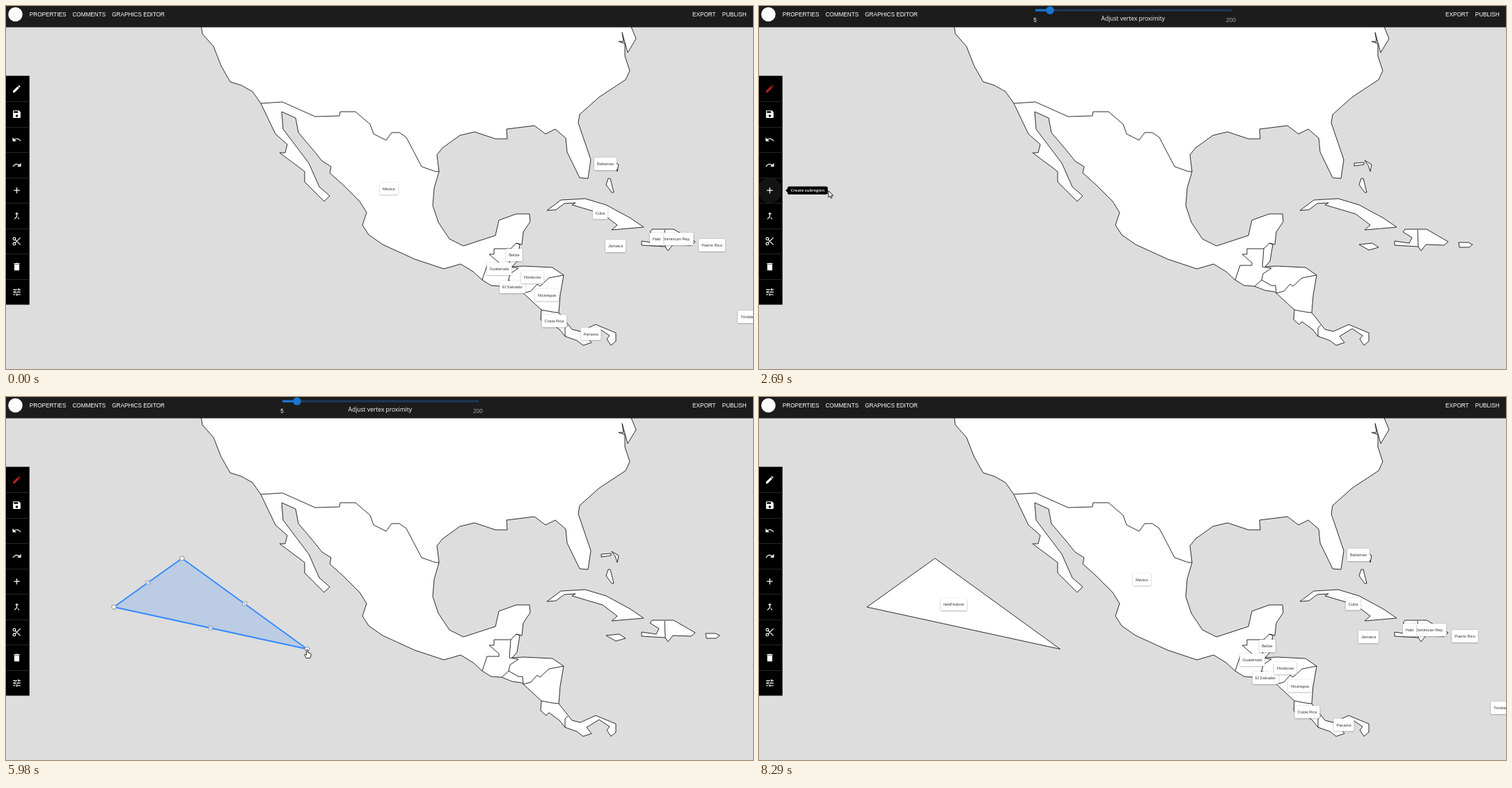
An HTML page with a canvas for the animation above (8.59 s loop, 1073 by 522 pixels).

```html
<!DOCTYPE html>
<html lang="en">
<head>
<meta charset="utf-8">
<title>Map editor</title>
<style>
html, body { margin: 0; width: 100%; height: 100%; overflow: hidden; background: #ddd; }
canvas { display: block; }
</style>
</head>
<body>
<canvas id="stage" width="1073" height="522"></canvas>
<script>
const W = 1073, H = 522, LOOP = 8590;
const ctx = document.getElementById('stage').getContext('2d');
const SANS = '"Liberation Sans", Arial, sans-serif';
const OPEN = '"Open Sans", "Noto Sans", sans-serif';

// The mainland is one coastline, followed from the north-west round to the north-east
const mainland = new Path2D(
  // California, Baja and the Mexican Pacific
  'M280 26L282 40 298 58 309 86 322 109 338 114 354 123 366 140 387 184 404 199 401 211 393 211' +
  ' 429 238 429 253 457 281 465 273 450 260 435 226 398 177 396 152 416 161 420 182 442 208' +
  ' 454 223 467 231 465 240 484 257 508 281 518 297 512 315 521 329 541 343 587 364 629 378' +
  ' 653 371 671 382 684 394' +
  // Central America, down and back
  'L697 402 712 403 727 409 741 411 769 437 768 451 776 458 780 454 795 465 803 475 820 481' +
  ' 829 488 841 484 834 475 852 464 867 474 863 479 869 488 876 482 876 470 847 458 825 468' +
  ' 813 465 794 441 796 416 801 387 785 376 744 374 727 375 734 367 738 343 733 341' +
  // Gulf and Atlantic
  'L741 343 743 325 753 310 752 299 733 299 708 308 703 330 657 345 637 335 621 311 613 287' +
  ' 615 262 622 238 619 214 627 204 652 186 673 181 703 191 720 191 719 177 759 172 775 184' +
  ' 789 177 804 190 806 210 824 247 836 248 840 221 822 168 824 156 852 131 890 106 896 93' +
  ' 889 72 889 54 880 51 887 51 885 38 893 67 905 47 898 30 914 26Z');

const borders = new Path2D(
  'M366 140L397 138 444 159 479 158 480 152 502 152 523 170 528 184 546 193 554 182 565 182' +
  ' 575 189 597 231 617 238 622 238' +
  'M733 341L725 349H701V357H694L708 369V373H691L684 394' +
  'M725 349L723 375 736 377 724 385 722 394 712 403M722 394L736 402H742L743 413' +
  'L754 410 763 400 767 403 780 391 801 387M769 437L785 440 794 441M807 459L803 463 803 475');

const islands = [
  'M777 294L797 279 832 277 862 286 897 305 916 318 870 322 878 315 857 299 813 286 818 283 802 284 790 293Z',
  'M913 338L934 341 938 333 925 325 928 321 959 321 990 339 984 344 958 343 951 352 947 346 913 344ZM946 322L947 346',
  'M1005 340H1019L1025 343 1020 347H1006Z',
  'M862 343L881 341 890 347 876 351Z',
  'M855 226L869 225V228L855 230Z',
  'M870 222L880 228 878 238 875 229Z',
  'M865 248H868L873 268H870L862 257Z'
].map(d => new Path2D(d));

const labels = [
  ['Bahamas', 861, 227], ['Mexico', 550, 262.5], ['Cuba', 853.5, 297.5],
  ['Dominican Rep.', 963, 335], ['Haiti', 934.5, 335], ['Jamaica', 875.5, 345],
  ['Puerto Rico', 1014, 344], ['Belize', 730, 358], ['Guatemala', 708.5, 378],
  ['El Salvador', 727.5, 404], ['Honduras', 756, 390], ['Nicaragua', 777, 415.5],
  ['Costa Rica', 787.5, 453], ['Panama', 840, 471.5], ['Trinidad and Tobago', 1081, 447]
];

// Icons on a 24 unit grid: filled part, stroked part, mirrored
const back = ['M2 7V16H11Z', 'M5.5 12.8Q14 5.5 21.3 15.6'];
const icons = [
  ['M3 17.2V21H6.8L17.8 10 14 6.2ZM20.8 7L17 3.2 15.1 5.1 18.9 8.9Z'],
  ['M4 3H17L21 7V20L20 21H4L3 20V4ZM5 5V9H15V5ZM12 13a3 3 0 1 0 .1 0Z'],
  back,
  [...back, true],
  ['', 'M5 12H19M12 5V19'],
  ['M7.5 8H16.5L12 3.5Z', 'M6.3 19.7L12 14V7M14.3 16.3L17.7 19.7'],
  ['', 'M8 8L20.5 20.5M8 16L20.5 3.5M9 6a3 3 0 1 0-6 0 3 3 0 0 0 6 0M9 18a3 3 0 1 0-6 0 3 3 0 0 0 6 0'],
  ['M6 7H18V20L17 21H7L6 20ZM5 4H8.5L9.5 3H14.5L15.5 4H19V6H5Z'],
  ['', 'M3 6H13M16 3V9M16 6H21M3 12H8M8 9V15M11 12H21M3 18H9M12 15V21M12 18H21']
].map(([fill, line, flip]) => [new Path2D(fill), new Path2D(line || ''), flip ? -1 : 1]);

const arrowShape = new Path2D('M0 0V9.6L2.2 7.6 3.7 11 5.2 10.3 3.8 7.1H6.8Z');
const handShape = new Path2D('M-1 1Q0-.8 1 1V5L4.6 6 5.4 7V9.6L4.2 13H-1.2L-3.8 8.6Q-4-.2-1 8.8Z'.replace('Q-4-.2', 'Q-3.6 6.4'));

const A = [252.8, 232], B = [155, 302], C = [432.6, 362.5];
const PEN = [27, 119.5], PLUS = [16, 267], DISK = [14, 156], EXIT = [1050, 486];
const cell = i => 119 + i * 36.55;

// Times of the user's actions
const EDIT = 970, PICK = 2760, FIRST = 3280, SECOND = 4020, CLOSE = 4710, SAVE = 7250, SAVED = 7280;

const smooth = u => u * u * (3 - 2 * u);
const easeOut = u => 1 - (1 - u) ** 2;
const clamp = u => Math.max(0, Math.min(1, u));

// start, end, from, to, easing, sag of the path
const moves = [
  [30, 870, [1022, 514], PEN, easeOut, 0],
  [EDIT, 1750, PEN, PLUS, smooth, 0],
  [2410, 3110, PLUS, A, smooth, 12],
  [FIRST, 3803, A, B, smooth, 0],
  [SECOND, 4510, B, C, smooth, 0],
  [5980, 6690, C, DISK, smooth, 0],
  [7290, 8090, DISK, EXIT, smooth, 0],
  [8090, 8290, EXIT, [1058, 524], u => u * u, 0]
];

function pointer(t) {
  const [t0, t1, a, b, ease, sag] = moves.filter(m => t >= m[0]).pop() || moves[0];
  const p = ease(clamp((t - t0) / (t1 - t0)));
  return [a[0] + (b[0] - a[0]) * p, a[1] + (b[1] - a[1]) * p + sag * 4 * p * (1 - p)];
}

function polyline(list, close) {
  const path = new Path2D();
  list.forEach(p => path.lineTo(p[0], p[1]));
  if (close) path.closePath();
  return path;
}

function paint(path, fill, stroke, width = 1) {
  if (fill) { ctx.fillStyle = fill; ctx.fill(path, 'evenodd'); }
  if (stroke) { ctx.strokeStyle = stroke; ctx.lineWidth = width; ctx.stroke(path); }
}

function rect(x, y, w, h, color) {
  ctx.fillStyle = color;
  ctx.fillRect(x, y, w, h);
}

function box(x, y, w, h, r) {
  const path = new Path2D();
  path.roundRect(x, y, w, h, r);
  return path;
}

function disc(x, y, r, fill, stroke) {
  const path = new Path2D();
  path.arc(x, y, r, 0, Math.PI * 2);
  paint(path, fill, stroke);
}

function text(s, x, y, font, color, align = 'left') {
  ctx.font = font;
  ctx.fillStyle = color;
  ctx.textAlign = align;
  ctx.fillText(s, x, y);
}

function land(path) { paint(path, '#fff', '#161616', 0.9); }

function label([name, x, y]) {
  ctx.font = `5.7px ${SANS}`;
  const w = ctx.measureText(name).width + 8;
  ctx.save();
  ctx.shadowColor = 'rgba(0,0,0,.4)';
  ctx.shadowBlur = 2;
  ctx.shadowOffsetY = 0.6;
  paint(box(x - w / 2, y - 9, w, 18, 1.6), '#fff');
  ctx.restore();
  text(name, x, y + 2, ctx.font, '#333', 'center');
}

function vertex(p) { disc(p[0], p[1], 3.2, '#fff', '#888'); }

function midpoint(p, q) {
  const x = (p[0] + q[0]) / 2, y = (p[1] + q[1]) / 2;
  paint(box(x - 3, y - 3, 6, 6, 0), 'rgba(255,255,255,.55)', 'rgba(110,125,145,.6)');
}

function guide(p, q) {
  ctx.save();
  ctx.setLineDash([3.5, 4.5]);
  paint(polyline([p, q]), null, '#83add9');
  ctx.restore();
}

function drawing(t, cur) {
  if (t < FIRST) return;
  if (t >= SAVED) {
    land(polyline([A, B, C], true));
    return;
  }
  const done = t >= CLOSE;
  if (done) {
    paint(polyline([A, B, C], true), 'rgba(51,136,255,.2)', '#3388ff', 1.8);
    midpoint(A, B);
    midpoint(B, C);
    midpoint(C, A);
  } else if (t >= SECOND) {
    paint(polyline([A, B]), null, '#3388ff', 1.8);
    midpoint(A, B);
    guide(B, cur);
  } else guide(A, cur);
  if (t >= SAVE) return;
  vertex(A);
  if (t >= SECOND) vertex(B);
  if (done) vertex(C);
}

function header(edit) {
  rect(0, 0, W, 30.6, '#1c1c1c');
  disc(13.5, 12, 10.3, '#fff');
  [['PROPERTIES', 33.8], ['COMMENTS', 95.4], ['GRAPHICS EDITOR', 152.2],
   ['EXPORT', 986], ['PUBLISH', 1028.7]]
    .forEach(([s, x]) => text(s, x, 14.8, `8.2px ${SANS}`, '#fff'));
  if (!edit) return;
  rect(397, 4.6, 282, 3, '#1d3a5a');
  rect(397, 4.6, 21, 3, '#1976d2');
  disc(418, 6.1, 5.7, '#1976d2');
  text('5', 396.6, 23, `8.3px ${SANS}`, '#fff', 'center');
  text('200', 678, 23, `8.3px ${SANS}`, '#a4a4a4', 'center');
  text('Adjust vertex proximity', 537.3, 20.6, `8.5px ${OPEN}`, '#fff', 'center');
}

function toolbar(t, edit) {
  rect(0, 100.4, 33.7, 329.1, '#000');
  if (t > 1600 && t < PICK) {
    ctx.save();
    ctx.clip(box(0, 247, 33.7, 36, 0));
    disc(15.5, cell(4), 18, '#131313');
    ctx.restore();
  }
  icons.forEach(([fill, line, side], i) => {
    if (i) rect(0, Math.round(cell(i) - 18.5), 33.7, 1, '#262626');
    const color = edit && i === 0 ? '#b02020' : '#fff';
    ctx.save();
    ctx.translate(15.5, cell(i));
    ctx.scale(0.6 * side, 0.6);
    ctx.translate(-12, -12);
    ctx.lineJoin = 'miter';
    paint(fill, color);
    paint(line, null, color, 2);
    ctx.restore();
  });
}

function tooltip(t, s, row, from, to) {
  const alpha = Math.min(clamp((t - from) / 80), clamp((to - t) / 110));
  if (!alpha) return;
  const y = cell(row);
  ctx.save();
  ctx.globalAlpha = alpha;
  ctx.font = `600 5.9px ${OPEN}`;
  paint(box(41, y - 5.8, ctx.measureText(s).width + 9.2, 11.6, 2), '#000');
  paint(polyline([[38.2, y], [41.2, y - 3], [41.2, y + 3]], true), '#000');
  text(s, 45.6, y + 2.1, ctx.font, '#fff');
  ctx.restore();
}

function cursor(t, [x, y]) {
  if (t < 30 || t >= 8290) return;
  ctx.save();
  if (t >= PICK && t < CLOSE) {
    ctx.translate(Math.floor(x), Math.floor(y));
    rect(-6, 0, 13, 1, '#000');
    rect(0, -6, 1, 13, '#000');
  } else {
    ctx.translate(x, y);
    const overShape = t >= CLOSE && t < SAVE && x > 219;
    paint(x < 34 || overShape ? handShape : arrowShape, '#fff', '#222');
  }
  ctx.restore();
}

function draw(t) {
  const edit = t >= EDIT && t < SAVED;
  const cur = pointer(t);
  rect(0, 0, W, H, '#ddd');
  ctx.lineJoin = 'round';
  land(mainland);
  paint(borders, null, '#161616', 0.9);
  islands.forEach(land);
  drawing(t, cur);
  if (!edit) {
    labels.forEach(label);
    if (t >= SAVED) label(['newFeature', 279.7, 298.3]);
  }
  header(edit);
  toolbar(t, edit);
  tooltip(t, 'Edit mode', 0, 780, 1250);
  tooltip(t, 'Create subregion', 4, 1600, 2820);
  tooltip(t, 'Save', 1, 6600, 7520);
  cursor(t, cur);
}

const begin = performance.now();
function tick() {
  draw((performance.now() - begin) % LOOP);
  requestAnimationFrame(tick);
}
tick();
</script>
</body>
</html>
```
